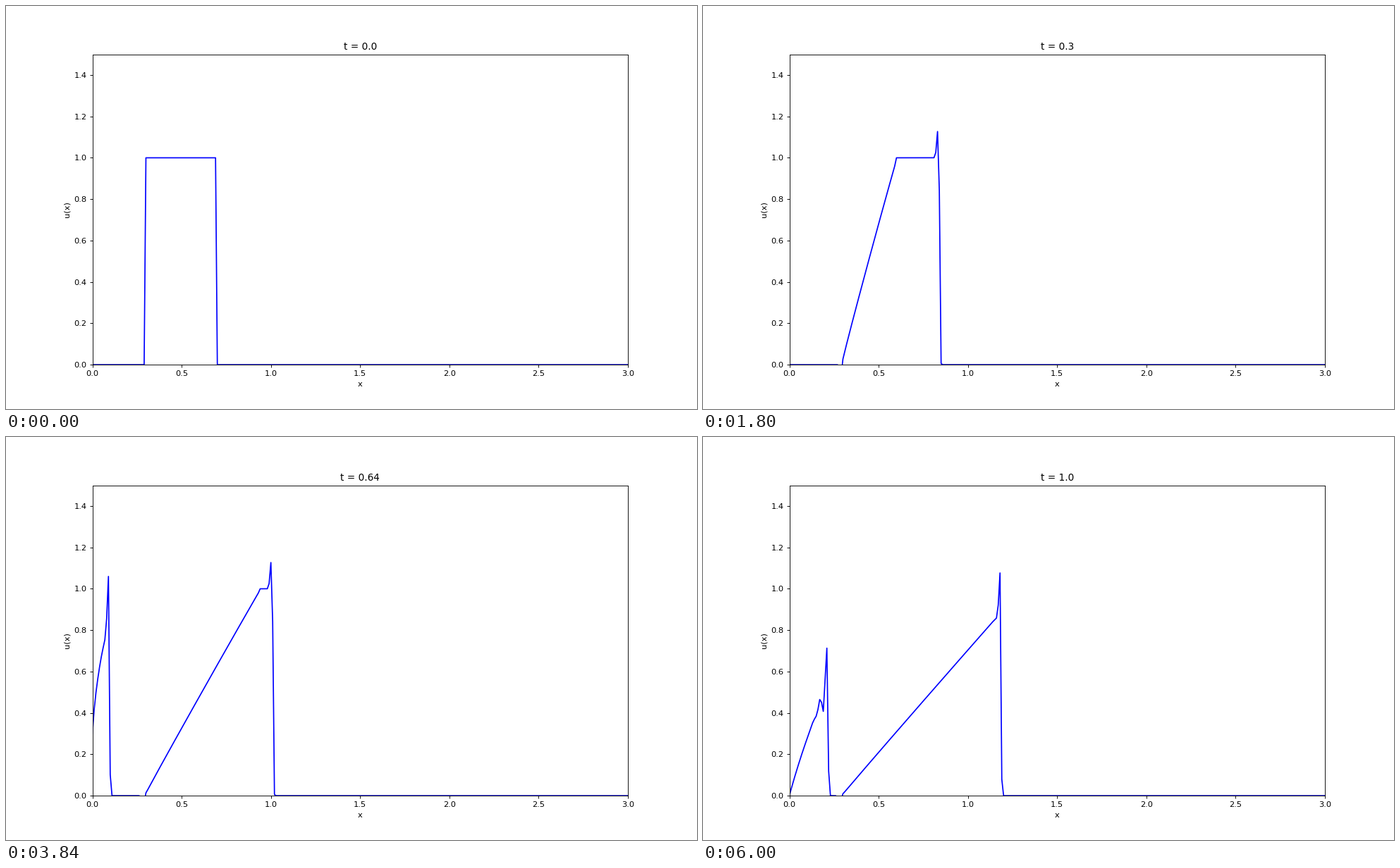
Recreate the animation shown at these times as a matplotlib script. Size 980 by 572 pixels, loop 6.06 s.

```python
import matplotlib.pyplot as plt
import numpy as np
from matplotlib.animation import FuncAnimation

STEPS = 100
DT = DX = 0.01


def inflow(t):
    """Triangular pulse entering at x = 0."""
    return max(0.0, 1 - 5 * abs(t - 0.5))


def flux(u):
    return u * u / 2


def advance(u, t):
    """One Richtmyer (two-step Lax-Wendroff) step of Burgers' equation."""
    r = DT / DX
    mid = (u[1:] + u[:-1]) / 2 - r / 2 * np.diff(flux(u))
    new = u.copy()
    new[1:-1] -= r * np.diff(flux(mid))
    new[0] = inflow(t)
    new[-1] = 0
    return new


x = np.linspace(0, 3, 301)
u = np.zeros_like(x)
u[30:70] = 1
states = [u]
for n in range(1, STEPS + 1):
    states.append(advance(states[-1], n / STEPS))

# 980 x 572 pixels, with text and lines sized for a 12 inch wide figure
fig, ax = plt.subplots(figsize=(12, 7.00409), dpi=980 / 12)
ax.set(xlim=(0, 3), ylim=(0, 1.5), xlabel="x", ylabel="u(x)")
ax.set_xticks(np.arange(0, 3.1, 0.5))
ax.set_yticks(np.arange(0, 1.5, 0.2))
line, = ax.plot(x, states[0], color="blue", lw=1.5)
title = ax.set_title("t = 0.0")


def draw(n):
    line.set_ydata(states[n])
    title.set_text(f"t = {n / STEPS}")
    return line, title


anim = FuncAnimation(fig, draw, frames=STEPS + 1, interval=60,
                     repeat=True, repeat_delay=0, blit=False)
plt.show()
```
